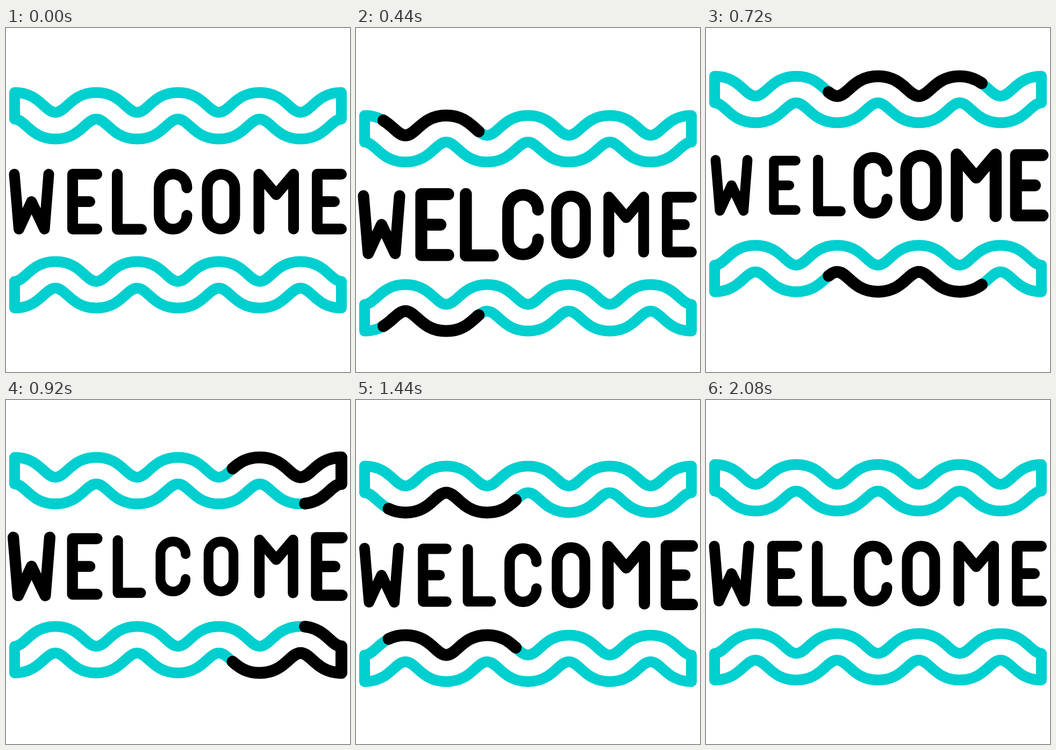
Recreate the animation shown at these times as an HTML page. Size 640 by 640 pixels, loop 2120 ms.

```html
<!DOCTYPE html>
<html lang="en">
<head>
<meta charset="utf-8">
<title>Welcome</title>
<style>
  html, body { margin: 0; width: 100%; height: 100%; overflow: hidden; background: #fff; }
  svg { display: block; width: 100vw; height: 100vh; }
  path { fill: none; stroke: #000; stroke-width: 20; stroke-linecap: round; stroke-linejoin: round; }
  .band { stroke: #00cfcf; }
  .trail { stroke-width: 22; }
</style>
</head>
<body>
<svg viewBox="0 0 640 640" role="img" aria-label="WELCOME"><g id="scene"></g></svg>
<script>
const LOOP = 2120, STEP = 40;
const scene = document.getElementById('scene');

function addPath(d, className = '', transform = '') {
  const el = document.createElementNS('http://www.w3.org/2000/svg', 'path');
  el.setAttribute('d', d);
  el.setAttribute('class', className);
  el.setAttribute('transform', transform);
  return scene.appendChild(el);
}

const smooth = p => {
  p = Math.min(1, Math.max(0, p));
  return p * p * (3 - 2 * p);
};

// Eased value at time t through [time, value] keys
function track(keys, t) {
  if (t <= 0) return keys[0][1];
  for (let i = 1; i < keys.length; i++) {
    const [t0, a] = keys[i - 1], [t1, b] = keys[i];
    if (t < t1) return a + (b - a) * smooth((t - t0) / (t1 - t0));
  }
  return keys.at(-1)[1];
}

// Wave band: broad crests outside, tight bends inside
function bandPath() {
  const half = 76, rise = 37;
  const broadToTight = (dir, dy) => `c${46 * dir} 0 ${56 * dir} ${dy} ${half * dir} ${dy}`;
  const tightToBroad = (dir, dy) => `c${20 * dir} 0 ${30 * dir} ${dy} ${half * dir} ${dy}`;
  const top = broadToTight(1, rise) + tightToBroad(1, -rise);
  const bottom = tightToBroad(-1, rise) + broadToTight(-1, -rise);
  return 'M16 120' + top.repeat(4) + 'V169.5' + bottom.repeat(4) + 'Z';
}

const band = bandPath();
const sides = ['', 'matrix(1 0 0 -1 0 641)'];
sides.forEach(side => addPath(band, 'band', side));
const trails = sides.map(side => addPath(band, 'trail', side));
const bandLength = trails[0].getTotalLength();

const letterE = x => `M${x + 45} 272H${x}V374H${x + 45}M${x} 323H${x + 32}`;

// [centre x, strokes]
const letters = [
  [47.5, 'M15.5 272L24 374L47.5 323L71.5 374L79.5 272'],
  [146.5, letterE(124)],
  [229.5, 'M207 272V374.5H252'],
  [311, 'M336.5 297.5A25.75 25.75 0 0 0 285 297.5V348.5A25.75 25.75 0 0 0 336.5 348.5'],
  [400, 'M374.5 297.5A25.5 25.5 0 0 1 425.5 297.5V348.5A25.5 25.5 0 0 1 374.5 348.5Z'],
  [502.7, 'M470.5 374V272L502.7 310L535 272V374'],
  [601.5, letterE(579)]
].map(([x, d]) => ({ x, el: addPath(d) }));

const bob = [[0, 0], [400, 45.5], [760, -33], [1160, 23], [1520, 0]];
const pulse = [[0, 1], [320, 1.12], [640, .9], [960, 1.067], [1280, .95], [1520, 1]];
const LETTER_DELAY = 80, TRAIL_TIME = 1720, TRAIL_DELAY = 280;

function draw(t) {
  scene.setAttribute('transform', `translate(0 ${track(bob, t)})`);

  letters.forEach(({ x, el }, i) => {
    const k = track(pulse, t - i * LETTER_DELAY);
    el.setAttribute('transform', `translate(${x} 323) scale(${k}) translate(${-x} -323)`);
  });

  const head = bandLength * smooth(t / TRAIL_TIME);
  const tail = bandLength * smooth((t - TRAIL_DELAY) / TRAIL_TIME);
  for (const el of trails) {
    el.style.display = head > tail ? '' : 'none';
    el.style.strokeDasharray = `${head - tail} 9999`;
    el.style.strokeDashoffset = -tail;
  }
}

const start = performance.now();
function tick() {
  const t = (performance.now() - start) % LOOP;
  draw(Math.floor(t / STEP) * STEP);
  requestAnimationFrame(tick);
}
tick();
</script>
</body>
</html>
```
